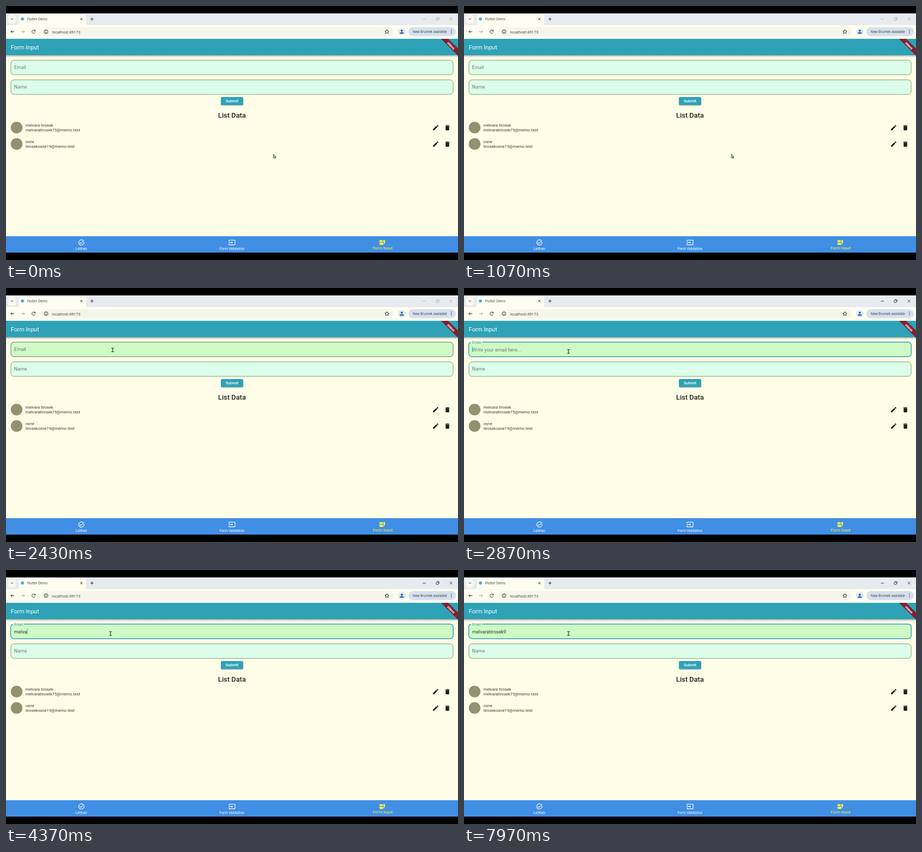
Write an HTML page that moves like this. It is 852x480 px and loops after 8 s.

```html
<!DOCTYPE html>
<html lang="en">
<head>
<meta charset="utf-8">
<title>Form Input</title>
<style>
  html, body { margin: 0; width: 100%; height: 100%; overflow: hidden; background: #000; }
  svg { display: block; width: 100%; height: 100%; }
  text { font-family: Roboto, sans-serif; white-space: pre; }
  .browser text { font-family: "Open Sans", "Noto Sans", sans-serif; fill: #35362f; }
  .line { fill: none; stroke: #2e2f29; stroke-width: 1; }
  .field { fill: #dcfdea; stroke: #7f9f66; stroke-width: 1; }
  .label { font-size: 9.1px; fill: #6d8070; }
  .row { font-size: 7.7px; fill: #3b3b2e; }
  .nav { font-size: 6.7px; fill: #fff; text-anchor: middle; }
</style>
</head>
<body>
<svg viewBox="0 0 852 480">
  <defs>
    <path id="edit" d="M3 17.25V21h3.75L17.81 9.94l-3.75-3.75zM20.71 7.04a1 1 0 0 0 0-1.41l-2.34-2.34a1 1 0 0 0-1.41 0l-1.83 1.83 3.75 3.75z"/>
    <path id="trash" d="M6 19c0 1.1.9 2 2 2h8c1.1 0 2-.9 2-2V7H6zM19 4h-3.5l-1-1h-5l-1 1H5v2h14z"/>
    <linearGradient id="shade" x2="0" y2="1">
      <stop stop-color="#555" stop-opacity=".45"/><stop offset="1" stop-color="#555" stop-opacity="0"/>
    </linearGradient>
  </defs>
  <rect width="852" height="480"/>
  <rect y="14" width="852" height="452" fill="#fefde8"/>

  <g class="browser">
    <rect y="14" width="852" height="22" fill="#e7eaee"/>
    <rect x="3" y="17" width="16" height="16" rx="5" fill="#f8f9ec"/>
    <path class="line" d="M9 23.5l2.2 2.2 2.2-2.2"/>
    <path d="M21 36q3 0 3-3V21q0-4 4-4H147q4 0 4 4v12q0 3 3 3z" fill="#fefef0"/>
    <circle cx="31" cy="24.5" r="3" fill="#4bafd8"/>
    <text x="40" y="27" font-size="6.25">Flutter Demo</text>
    <path class="line" d="M139.7 22.5l4.4 4.4m0-4.4l-4.4 4.4M159 24.7h6m-3-3v6"/>
    <g id="windowButtons" fill="none" stroke-width=".9">
      <path d="M785.5 24.8h6M836.3 22l5.2 5.2m0-5.2l-5.2 5.2"/>
      <rect x="810.8" y="23" width="4.3" height="4.3" rx=".8"/>
      <path d="M812.3 21.7h3q1.1 0 1.1 1.1v3"/>
    </g>
    <rect y="36" width="852" height="26" fill="#fefef0"/>
    <path class="line" d="M15.5 48.5H9m3-3l-3 3 3 3M54.8 46.8a3.2 3.2 0 1 0 .3 2.8M55.2 45v2.3h-2.3"/>
    <path class="line" d="M28.5 48.5H35m-3-3l3 3-3 3" style="stroke:#a9aaa0"/>
    <rect x="66" y="40" width="665" height="17" rx="8.5" fill="#f5f6e9"/>
    <circle cx="75.5" cy="48.5" r="3.5" class="line"/>
    <path class="line" d="M75.5 48v2.6m0-4.2v.9"/>
    <text x="87" y="51.6" font-size="7.25">localhost:49173</text>
    <path class="line" d="M718 44.7l1.15 2.5 2.75.3-2.05 1.85.57 2.7-2.42-1.38-2.42 1.38.57-2.7-2.05-1.85 2.75-.3z"/>
    <circle cx="746" cy="48.5" r="7" fill="#dce9f3"/>
    <path d="M742.3 52.2v-.8q0-2 3.7-2t3.7 2v.8z" fill="#235ba3"/>
    <circle cx="746" cy="46.7" r="1.9" fill="#235ba3"/>
    <rect x="758.5" y="40" width="89.5" height="17" rx="8.5" fill="#d7e0ef"/>
    <text x="766.5" y="51" font-size="6.25">New Brumek available</text>
    <path d="M839.5 45.3v7" stroke="#333" stroke-width="1.6" stroke-linecap="round" stroke-dasharray="0 2.8"/>
  </g>

  <rect y="93" width="852" height="4" fill="url(#shade)"/>
  <rect y="62" width="852" height="31" fill="#2ea2b7"/>
  <text x="9" y="81.5" font-size="11" fill="#fff">Form Input</text>
  <path d="M820 62h13.5L852 80.5V94z" fill="#82202f"/>
  <text transform="translate(837.3 76.7) rotate(45)" text-anchor="middle" font-size="5.4" font-weight="900" fill="#fff">DEBUG</text>

  <rect id="emailBox" class="field" x="9.2" y="102.3" width="833.6" height="27.5" rx="6"/>
  <path id="focusBorder" d="M34 102.3H837a6 6 0 0 1 6 6v15.5a6 6 0 0 1-6 6H15a6 6 0 0 1-6-6V108.3q0-4.5 4-5.8" fill="none" stroke="#289fb4" stroke-width="1.5"/>
  <text id="emailLabel" class="label" x="15.3">Email</text>
  <text id="hint" class="label" x="15.3" y="119.5">Write your email here...</text>
  <text id="typed" x="15.3" y="119.5" font-size="9.05" fill="#2c3a2d"></text>
  <rect id="caret" y="111" width="1" height="10.5" fill="#289fb4"/>
  <rect id="nameBox" class="field" x="9.2" y="139.5" width="833.6" height="27.5" rx="6"/>
  <text class="label" x="15.3" y="156.2">Name</text>

  <rect x="405" y="173.2" width="42.5" height="15.3" rx="2.5" fill="#777" opacity=".45"/>
  <rect x="405" y="172" width="42" height="15.3" rx="2.3" fill="#2ea2b7"/>
  <text x="426" y="182.3" text-anchor="middle" font-size="7.6" font-weight="500" fill="#fff">Submit</text>
  <text x="426" y="211" text-anchor="middle" font-size="13.2" font-weight="500" fill="#22221b">List Data</text>
  <g id="rows"></g>

  <rect y="435" width="852" height="31" fill="#418fe4"/>
  <g fill="#fff">
    <path transform="translate(135.3 440.2) scale(.56)" d="M22 5.18L10.59 16.6l-4.24-4.24 1.41-1.41 2.83 2.83 10-10zm-2.21 5.04c.13.57.21 1.17.21 1.78a8 8 0 1 1-3.72-6.75l1.44-1.44A10 10 0 1 0 21.4 8.61z"/>
    <path transform="translate(419.3 440.2) scale(.56)" d="M21 3H3a2 2 0 0 0-2 2v4h2V5h18v14H3v-4H1v4a2 2 0 0 0 2 2h18a2 2 0 0 0 2-2V5a2 2 0 0 0-2-2zM11 16l4-4-4-4v3H1v2h10z"/>
    <path transform="translate(702.7 440.2) scale(.56)" fill="#fff238" fill-rule="evenodd" d="M17 20v-9h-2V4h7l-2 5h2zM15 13v7H4a2 2 0 0 1-2-2v-3a2 2 0 0 1 2-2zm-8.75 2.75h-1.5v1.5h1.5zM13 4v7H4a2 2 0 0 1-2-2V6a2 2 0 0 1 2-2zM6.25 6.75h-1.5v1.5h1.5z"/>
  </g>
  <text class="nav" x="142" y="460.7">Latihan</text>
  <text class="nav" x="426" y="460.7">Form Validation</text>
  <text class="nav" x="710" y="460.3" style="font-size:7.8px;fill:#fff238">Form Input</text>

  <g id="pointer">
    <path id="arrow" d="M0 0v7.2l1.7-1.5 1.2 2.6 1.2-.6-1.2-2.5h2.2z" fill="#8ee6b0" stroke="#143f35" stroke-width=".8"/>
    <path id="beam" d="M-2.5-3.5h5M0-3.5v7M-2.5 3.5h5" stroke="#163b20" stroke-width="1.2"/>
  </g>
</svg>
<script>
const LOOP = 8000, FOCUS = 2600, BLINK = 500;
const ADDRESS = 'melvaratirosek9';
const KEY_TIMES = [3770, 3900, 4030, 4170, 4300, 4500, 4670, 4830, 5000, 5270, 5600, 5670, 5730, 6230, 7700];
const POINTER_PATH = [[0, 504, 280], [1730, 504, 280], [2300, 201, 117], [2470, 201, 117], [2590, 197, 120], [LOOP, 197, 120]];

const el = Object.fromEntries([...document.querySelectorAll('[id]')].map(node => [node.id, node]));
const clamp = v => Math.min(1, Math.max(0, v));
const ease = v => v * v * (3 - 2 * v);
const mix = (a, b, v) => a + (b - a) * v;
const show = (node, on) => node.setAttribute('visibility', on ? 'visible' : 'hidden');

const people = [
  ['melvara tirosek', 'melvaratirosek75@memo.test'],
  ['osne', 'tirosekosne19@memo.test']
];
el.rows.innerHTML = people.map(([name, mail], i) => `
  <g transform="translate(0 ${i * 31})">
    <circle cx="20" cy="229.7" r="11" fill="#91926f"/>
    <text class="row" x="36.7" y="228">${name}</text>
    <text class="row" x="36.7" y="236.8">${mail}</text>
    <use href="#edit" transform="translate(803.2 223.2) scale(.56)" fill="#20211a"/>
    <use href="#trash" transform="translate(825.3 223.2) scale(.56)" fill="#20211a"/>
  </g>`).join('');

function pointerAt(t) {
  const i = POINTER_PATH.findIndex(step => step[0] > t);
  const [t0, x0, y0] = POINTER_PATH[i - 1], [t1, x1, y1] = POINTER_PATH[i];
  const v = ease((t - t0) / (t1 - t0));
  return [mix(x0, x1, v), mix(y0, y1, v)];
}

function caretOn(t, count) {
  if (t < FOCUS || t >= 7930) return false;
  const since = t - (count ? KEY_TIMES[count - 1] : FOCUS);
  return Math.floor(since / BLINK) % 2 === 0;
}

function draw(t) {
  const focused = t >= FOCUS;
  const [x, y] = pointerAt(t);
  const overEmail = y > 102 && y < 130, overName = y > 139 && y < 167;
  el.pointer.setAttribute('transform', `translate(${x} ${y})`);
  show(el.arrow, !(overEmail || overName));
  show(el.beam, overEmail || overName);

  el.emailBox.style.fill = overEmail ? '#cffac6' : '';
  el.emailBox.style.stroke = focused ? 'none' : overEmail ? '#597c50' : '';
  el.nameBox.style.fill = overName ? '#cffac6' : '';
  el.nameBox.style.stroke = overName ? '#597c50' : '';
  el.windowButtons.style.stroke = focused ? '#2e2f29' : '#b5b6ab';
  show(el.focusBorder, focused);

  const lift = ease(clamp((t - FOCUS) / 167));
  el.emailLabel.setAttribute('y', mix(119, 104.8, lift));
  el.emailLabel.style.fontSize = mix(9.1, 6.8, lift) + 'px';
  el.emailLabel.style.fill = focused ? '#3798a5' : '';

  const count = KEY_TIMES.filter(time => time <= t).length;
  el.typed.textContent = ADDRESS.slice(0, count);
  el.hint.style.opacity = count ? 0 : lift;
  show(el.caret, caretOn(t, count));
  el.caret.setAttribute('x', 15.3 + (count ? el.typed.getComputedTextLength() : 0));
}

const start = performance.now();
function tick() {
  draw((performance.now() - start) % LOOP);
  requestAnimationFrame(tick);
}
tick();
</script>
</body>
</html>
```
